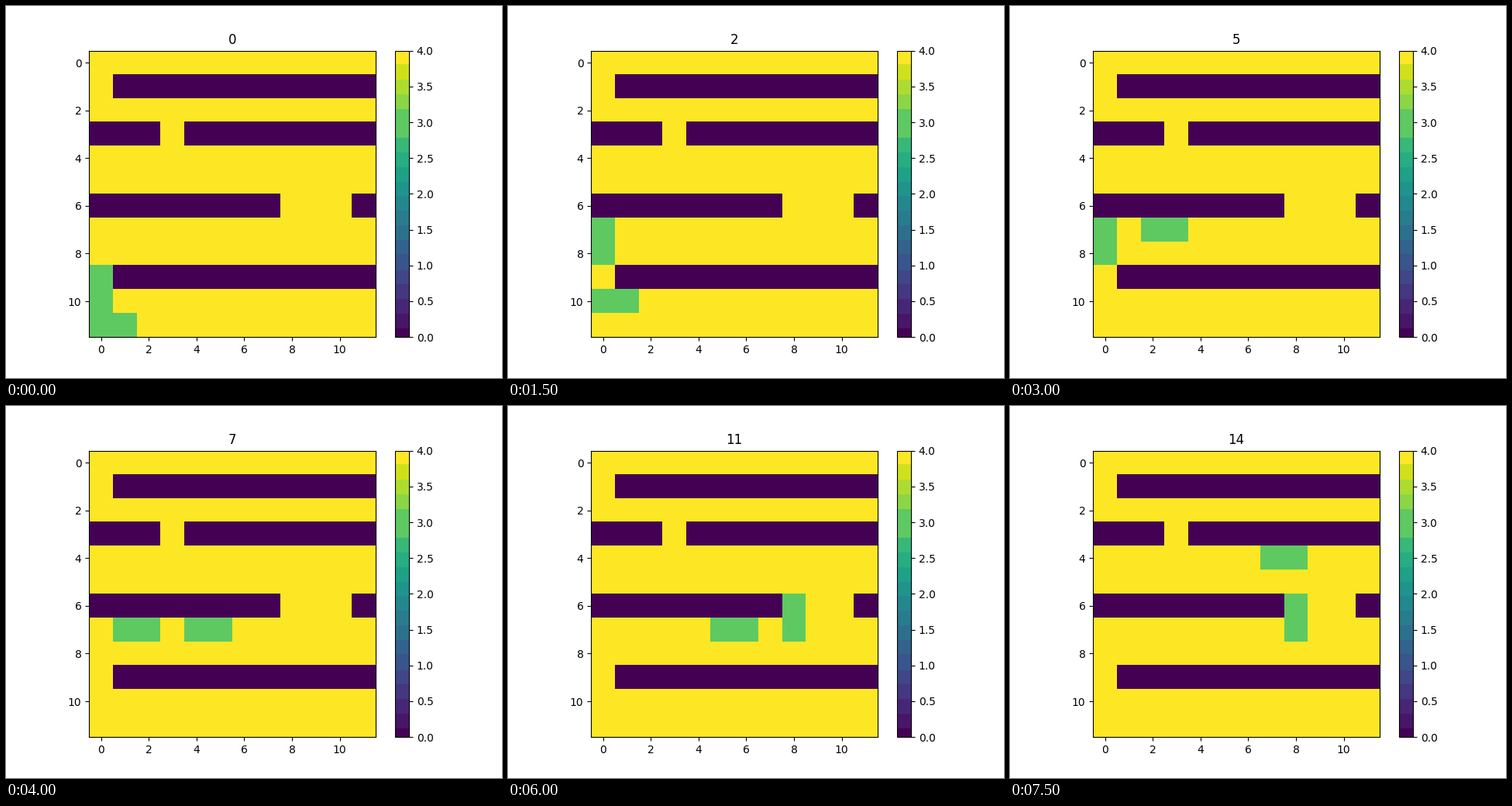
Recreate the animation shown at these times as a matplotlib script. Size 640 by 480 pixels, loop 8000 ms.

```python
import numpy as np
import matplotlib.pyplot as plt
from matplotlib.animation import FuncAnimation
from matplotlib.colors import ListedColormap

SIZE = 12
WALL, BODY, FREE = 0, 3, 4
WALLS = [(1, 1, 12), (3, 0, 3), (3, 4, 12), (6, 0, 8), (6, 11, 12), (9, 1, 12)]
CORNERS = [(11, 0), (11, 1), (10, 1), (10, 0), (7, 0), (7, 8), (4, 8), (4, 7)]
OFFSETS = (0, 1, 3, 4)  # two pairs of cells with a gap of one between them


def walk(corners):
    """List every cell on the path through the corners."""
    cells = [corners[0]]
    for target in corners[1:]:
        while cells[-1] != target:
            row, col = cells[-1]
            cells.append((row + int(np.sign(target[0] - row)),
                          col + int(np.sign(target[1] - col))))
    return cells


def banded_viridis():
    """Viridis reduced to twenty flat bands."""
    edges = np.linspace(0.03, 0.953, 19)
    levels = np.concatenate([[0], (edges[:-1] + edges[1:]) / 2, [1]])
    levels[14:16] = BODY / FREE
    bands = np.digitize(np.linspace(0, 1, 256), edges)
    return ListedColormap(plt.get_cmap("viridis")(levels[bands]))


PATH = walk(CORNERS)


def grid(step):
    cells = np.full((SIZE, SIZE), FREE)
    for row, start, stop in WALLS:
        cells[row, start:stop] = WALL
    for offset in OFFSETS:
        cells[PATH[step + offset]] = BODY
    return cells


fig, ax = plt.subplots(figsize=(6.4, 4.8), dpi=100)
image = ax.imshow(grid(0), cmap=banded_viridis(), vmin=WALL, vmax=FREE,
                  interpolation="nearest")
fig.colorbar(image, ax=ax)
title = ax.set_title("0")


def update(frame):
    step = max(0, frame - 1)  # the first pose is held for two ticks
    image.set_data(grid(step))
    title.set_text(str(step))
    return image, title


anim = FuncAnimation(fig, update, frames=16, interval=500, repeat=True,
                     repeat_delay=0, blit=False)
plt.show()
```
